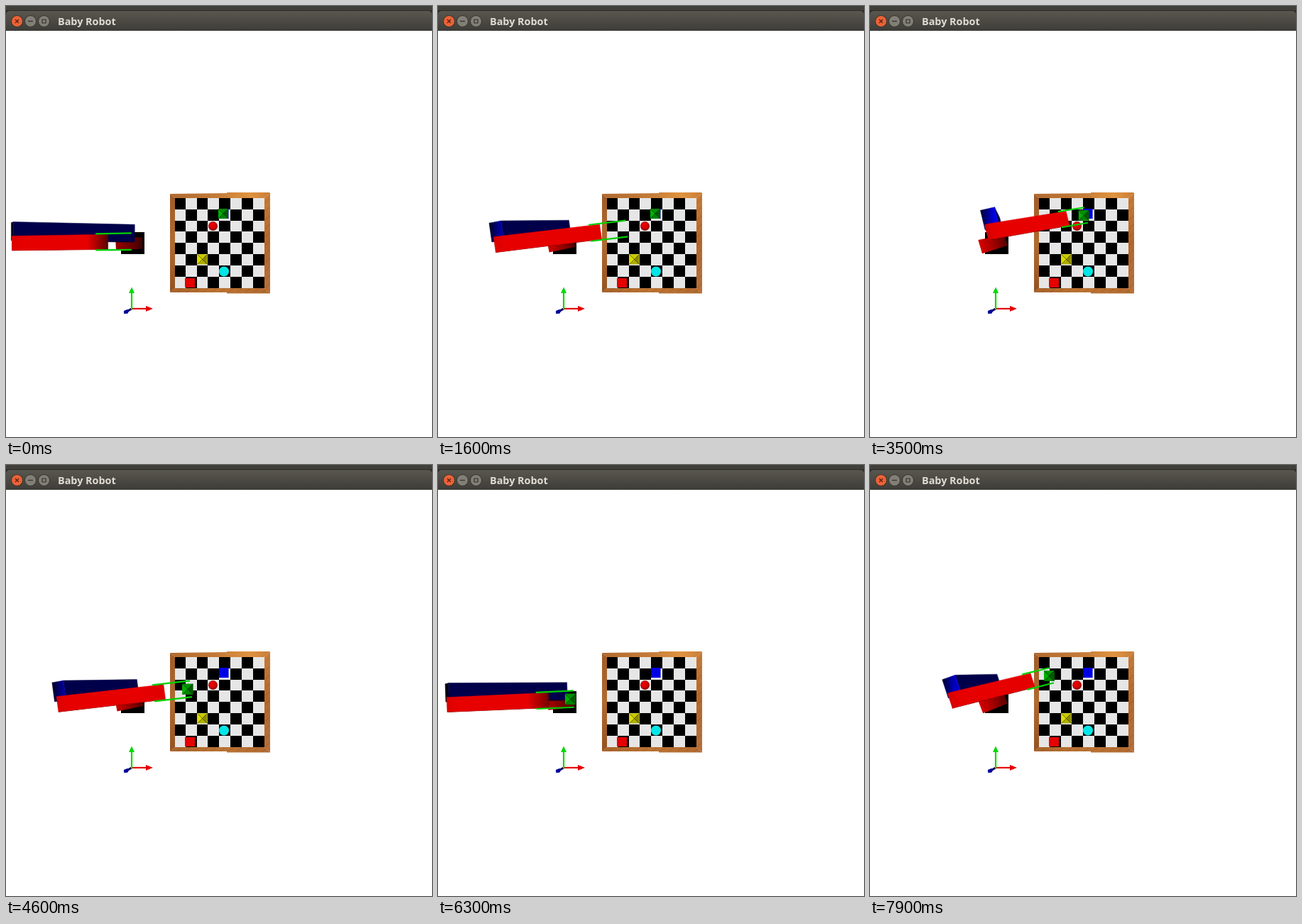
Write an HTML page with a canvas that moves like this. It is 600 px wide and 608 px high and loops after 8000 ms.

```html
<!DOCTYPE html>
<html lang="en">
<head>
<meta charset="utf-8">
<title>Baby Robot</title>
<style>
  html, body { margin: 0; width: 100%; height: 100%; overflow: hidden; background: #fff; }
  canvas, .bar, .bar svg { position: absolute; left: 0; top: 0; display: block; }
  .bar { width: 600px; height: 35px; background: #2b2a27; }
  .top { position: absolute; left: 0; top: 0; width: 600px; height: 6px; background: #403f3a; }
  .head { position: absolute; left: 0; top: 7px; width: 600px; height: 28px;
    border-radius: 5px 5px 0 0; background: linear-gradient(#59574f, #3d3c38); }
  .name { position: absolute; left: 73px; top: 12px; white-space: nowrap;
    font: bold 14.4px/20px "Open Sans", "Noto Sans", sans-serif; color: #dfdbd2; }
</style>
</head>
<body>
<canvas id="stage" width="600" height="608"></canvas>
<div class="bar">
  <div class="top"></div>
  <div class="head"></div>
  <svg width="70" height="35" fill="none" stroke="#33322d">
    <circle cx="15.5" cy="21.5" r="8" fill="#ec6237"/>
    <path d="M13 19l5 5M18 19l-5 5" stroke="#5a2411" stroke-width="1.4"/>
    <circle cx="34.5" cy="21.5" r="8" fill="#817f76"/>
    <path d="M31 21.5h7" stroke-width="1.3"/>
    <circle cx="53.5" cy="21.5" r="8" fill="#817f76"/>
    <path d="M51 19h5v5h-5z" stroke-width="1.2"/>
  </svg>
  <div class="name">Baby Robot</div>
</div>
<script>
const ctx = document.getElementById('stage').getContext('2d');
const LOOP = 8000, STEP = 100, REACH = 29;

// Camera looks straight down; the arm swings around the pivot
const CAMERA = { x: 300, y: 390, height: 1390 };
const PIVOT = { x: 141.5, y: 337 };
const SHOULDER = 36, UPPER = 168, FORE = 139, FINGER = 36;

// Joint angles in degrees: start, and turn per step
const HOME = { yaw: 0, upper: 21.5, fore: -18.5 };
const PICK = { yaw: -0.54, upper: 2.85, fore: 2.55 };
const PLACE = { yaw: -1, upper: 3.05, fore: 3.5 };

const red = v => `rgb(${Math.round(v)},0,0)`;
const blue = v => `rgb(0,0,${Math.round(v)})`;

function poly(fill, ...p) {
  ctx.beginPath();
  for (let i = 0; i < p.length; i += 2) ctx.lineTo(p[i], p[i + 1]);
  ctx.closePath();
  ctx.fillStyle = fill;
  ctx.fill();
}
function line(color, width, x1, y1, x2, y2) {
  ctx.beginPath();
  ctx.moveTo(x1, y1);
  ctx.lineTo(x2, y2);
  ctx.strokeStyle = color;
  ctx.lineWidth = width;
  ctx.stroke();
}
function disc(fill, x, y, r) {
  ctx.beginPath();
  ctx.arc(x, y, r, 0, Math.PI * 2);
  ctx.fillStyle = fill;
  ctx.fill();
}
function rect(fill, x, y, w, h) {
  ctx.fillStyle = fill;
  ctx.fillRect(x, y, w, h);
}
function fade(x1, y1, x2, y2, ...stops) {
  const g = ctx.createLinearGradient(x1, y1, x2, y2);
  stops.forEach(([at, color]) => g.addColorStop(at, color));
  return g;
}

function pyramid(x, y, size, top, right, bottom, left) {
  const r = size / 2, a = x - r, b = x + r, c = y - r, d = y + r;
  rect(bottom, a, c, size, size);
  poly(top, a, c, b, c, x, y);
  poly(right, b, c, b, d, x, y);
  poly(left, a, c, a, d, x, y);
  line('rgba(0,0,0,.45)', 1, a, c, b, d);
  line('rgba(0,0,0,.45)', 1, b, c, a, d);
}
const green = (x, y, size) => pyramid(x, y, size, '#009000', '#005c00', '#008400', '#00b000');

function board() {
  poly(fade(231, 0, 372, 0, [0, '#b06a30'], [0.5, '#c67c38'], [0.8, '#e09440'], [1, '#c87c38']),
    231, 265, 311, 264, 311, 263, 372, 263, 364, 271, 238, 271);
  poly(fade(0, 263, 0, 405, [0, '#c87c38'], [0.5, '#b4682c'], [1, '#b87038']),
    372, 263, 372, 405.5, 364, 398, 364, 271);
  poly(fade(231, 0, 372, 0, [0, '#a8622a'], [0.5, '#bc7434'], [1, '#b06a30']),
    231, 404, 311, 404, 311, 405.5, 372, 405.5, 364, 398, 238, 398);
  poly(fade(0, 265, 0, 404, [0, '#a05c28'], [0.5, '#b06a30'], [1, '#945222']),
    231, 265, 238, 271, 238, 398, 231, 404);
  for (let k = 0; k < 130; k += 12) {
    line('rgba(110,55,15,.3)', 1, 365, 278 + k, 371, 272 + k);
    line('rgba(110,55,15,.25)', 1, 241 + k, 404, 248 + k, 399);
  }
  rect('#e6e6e6', 238, 271, 126, 127);
  const col = i => Math.floor(238 + 15.6 * i + 0.02 * i * i);
  const row = i => Math.round(271 + 15.82 * i);
  for (let r = 0; r < 8; r++)
    for (let c = r % 2; c < 8; c += 2)
      rect('#000', col(c), row(r), col(c + 1) - col(c), row(r + 1) - row(r));

  rect('#0000e6', 300, 286, 13.5, 14);
  const ball = ctx.createRadialGradient(290, 308, 1, 291.5, 310.5, 7);
  ball.addColorStop(0, '#f00000');
  ball.addColorStop(0.6, '#d00000');
  ball.addColorStop(1, '#700000');
  disc(ball, 291.5, 310.5, 6.5);
  pyramid(276.5, 357.5, 14, '#c8c800', '#8c8c00', '#b0b000', '#dcdc00');
  disc('#00e6e6', 307, 374.5, 7);
  rect('#e60000', 252, 384, 14, 13);
}

function axes() {
  line('#000060', 3, 177, 427, 171, 430.5);
  poly('#0000a0', 166, 430, 171, 428, 173, 431, 171, 434, 166, 434);
  line('#e60000', 2.2, 177, 427, 198, 427);
  poly('#e60000', 197, 423, 207, 427, 197, 431);
  line('#00d800', 2.2, 177, 428, 177, 404);
  poly('#00d800', 173, 405, 177, 396.5, 181, 405);
}

// Angles to a function that projects (distance, height, sideways)
function projector(yaw) {
  const c = Math.cos(yaw), s = Math.sin(yaw);
  return (r, z, side) => {
    const k = CAMERA.height / (CAMERA.height - z);
    return [
      CAMERA.x + (PIVOT.x + r * c - side * s - CAMERA.x) * k,
      CAMERA.y + (PIVOT.y + r * s + side * c - CAMERA.y) * k,
      k
    ];
  };
}

// Visible faces of a bar: profile corners run start top, end top, end bottom, start bottom
function bar(project, profile, near, far, paint, edge) {
  const at = (p, side) => project(p[0], p[1], side).slice(0, 2);
  const face = (fill, pts) => {
    let area = 0;
    pts.forEach(([x, y], i) => {
      const [x2, y2] = pts[(i + 1) % pts.length];
      area += x * y2 - x2 * y;
    });
    if (area <= 0) return;
    const color = typeof fill === 'function' ? fill(pts) : fill;
    poly(color, ...pts.flat());
    ctx.strokeStyle = color;
    ctx.lineWidth = 0.5;
    ctx.stroke();
  };
  face(edge, profile.map(p => at(p, far)));
  profile.forEach((p, i) => {
    const q = profile[(i + 1) % 4];
    face(paint[i], [at(p, near), at(q, near), at(q, far), at(p, far)]);
  });
}

function base(yaw) {
  rect('#000', 162, 319, 33, 31);
  ctx.save();
  ctx.translate(174, 334.5);
  ctx.rotate(yaw);
  const lit = 150 + Math.min(1, -yaw * 6) * 65;
  poly(fade(-20, 0, 19, 0, [0, red(lit)], [0.5, red(lit * 0.75)], [1, red(lit * 0.4)]),
    -20, -9.5, 18, -8, 18, 8, -19, 10.5);
  ctx.restore();
}

function arm(turn, u, held) {
  const angle = name => (HOME[name] + turn[name] * u) * Math.PI / 180;
  const yaw = angle('yaw'), up = angle('upper'), down = angle('fore');
  const project = projector(yaw);
  const c = Math.cos(up), s = Math.sin(up), dr = Math.cos(down), dz = -Math.sin(down);
  const er = SHOULDER - UPPER * c, ez = UPPER * s;
  base(yaw);

  const glow = Math.min(230, 40 + 180 * Math.max(0, up - 0.44));
  const shoulder = k => [SHOULDER + k * s, k * c], elbow = k => [er + k * s, ez + k * c];
  const cap = pts => fade(pts[0][0], 0, pts[1][0], 0, [0, blue(glow * 0.2)], [1, blue(glow)]);
  bar(project, [elbow(13), shoulder(13), shoulder(-5), elbow(-5)], -28, -4,
    [blue(74), blue(30), blue(glow), cap], blue(glow * 0.5));

  const along = (d, k = 0) => [er + d * dr - k * dz, ez + d * dz + k * dr];
  const shade = Math.min(226, 105 + 190 * (down + 0.32));
  const skin = pts => fade(...pts[0], ...pts[1], [0, red(220)], [0.1, red(230)], [0.8, red(230)], [1, red(shade)]);
  bar(project, [along(0), along(FORE), along(FORE, -6), along(0, -6)], -9.7, 9.7,
    [skin, red(shade * 0.9), red(170), red(215)], red(120));

  if (held) {
    const [x, y, k] = project(...along(FORE + FINGER - 4.5), 0);
    green(x, y, 14 * k);
  }
  for (const side of [-10.7, 10.7]) {
    const [x1, y1] = project(...along(FORE - 15), side);
    const [x2, y2] = project(...along(FORE + FINGER), side);
    line('#00d000', 2.2, x1, y1, x2, y2);
  }
}

// Reach out, bring the piece home, then swing to the new square
function scene(n) {
  const held = n > 31, placing = n > 61;
  const u = placing ? n - 61 : Math.max(0, Math.min(REACH, held ? REACH + 31 - n : n - 1));
  ctx.clearRect(0, 0, 600, 608);
  board();
  axes();
  if (!held) green(306, 293, 14);
  arm(placing ? PLACE : PICK, u, held);
}

const start = performance.now();
function tick() {
  scene(Math.floor(((performance.now() - start) % LOOP) / STEP));
  requestAnimationFrame(tick);
}
tick();
</script>
</body>
</html>
```
